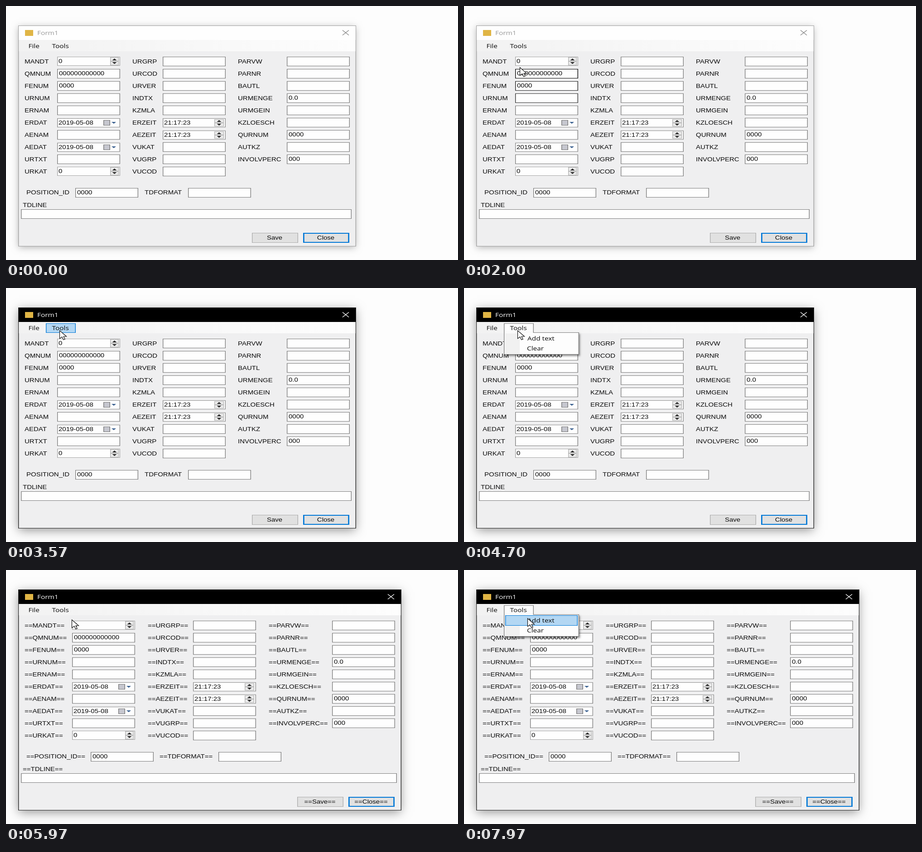
An HTML page with a canvas that plays this animation: 998x561 px, repeating every 8 s.

```html
<!DOCTYPE html>
<html lang="en">
<head>
<meta charset="utf-8">
<title>Form1</title>
<style>
  html, body { margin: 0; width: 100%; height: 100%; overflow: hidden; background: #fdfdfd; }
  canvas { display: block; width: 100vw; height: 100vh; }
</style>
</head>
<body>
<canvas id="stage" width="998" height="561"></canvas>
<script>
const ctx = document.getElementById('stage').getContext('2d');
const LOOP = 8000;
const ACTIVATE = 2900, RELAYOUT = 5900, REPAINT = 5860;
const MENU_OPEN = [[4250, REPAINT], [6950, LOOP]];
const SANS = '12px "Liberation Sans", Arial, sans-serif';
const UI = '12.3px "Open Sans", "Noto Sans", sans-serif';
const WIDE = 1.25;
const EDGE = 1.37;      // so upright lines are thicker than level ones
const BOX_W = 139, BLUE = '#0078d7', FACE = '#efeff0';

const COLUMNS = [
  'MANDT QMNUM FENUM URNUM ERNAM ERDAT AENAM AEDAT URTXT URKAT',
  'URGRP URCOD URVER INDTX KZMLA ERZEIT AEZEIT VUKAT VUGRP VUCOD',
  'PARVW PARNR BAUTL URMENGE URMGEIN KZLOESCH QURNUM AUTKZ INVOLVPERC'
].map(s => s.split(' '));
const VALUES = {
  MANDT: '0', URKAT: '0', QMNUM: '000000000000', FENUM: '0000',
  ERDAT: '2019-05-08', AEDAT: '2019-05-08', ERZEIT: '21:17:23', AEZEIT: '21:17:23',
  URMENGE: '0.0', QURNUM: '0000', INVOLVPERC: '000', POSITION_ID: '0000'
};
const KINDS = {
  MANDT: 'number', URKAT: 'number', ERDAT: 'date', AEDAT: 'date',
  ERZEIT: 'time', AEZEIT: 'time'
};
const NARROW = {
  right: 772, mark: '', labels: [41, 279, 512], boxes: [113, 346, 620],
  position: 153, formatLabel: 306, format: 402
};
const BROAD = {
  right: 872, mark: '==', labels: [41, 313, 580], boxes: [146, 413, 720],
  position: 187, formatLabel: 339, format: 469
};

// time, x, y of the pointer tip
const PATH = [
  [1270, -14, 482], [1350, 33, 461], [1400, 33, 461], [1500, 58, 395], [1700, 105, 245],
  [1800, 122, 196], [1900, 124, 160], [2000, 123, 136], [2250, 118, 94],
  [5150, 118, 94], [5500, 145, 110], [6200, 145, 110], [6500, 133, 87],
  [7000, 133, 87], [7350, 140, 107]
];

function pointer(t) {
  if (t < PATH[0][0]) return null;
  const i = PATH.findIndex(p => p[0] > t);
  if (i < 0) return PATH[PATH.length - 1].slice(1);
  const [t0, x0, y0] = PATH[i - 1], [t1, x1, y1] = PATH[i];
  const k = (t - t0) / (t1 - t0);
  return [x0 + (x1 - x0) * k, y0 + (y1 - y0) * k];
}

function inside(p, x, y, w, h) {
  return p && p[0] > x && p[0] < x + w && p[1] > y && p[1] < y + h;
}

// 1 while the pointer is on the box, fading out after it leaves
function glow(t, x, y, w, h) {
  if (t > ACTIVATE) return 0;
  for (let age = 0; age < 500; age += 20)
    if (inside(pointer(t - age), x + 1, y + 1, w - 2, h - 2)) return 1 - age / 500;
  return 0;
}

function fill(color, x, y, w, h) {
  ctx.fillStyle = color;
  ctx.fillRect(x, y, w, h);
}

function frame(x, y, w, h, back, border, line = 1) {
  const side = line * EDGE;
  fill(border, x, y, w, h);
  fill(back, x + side, y + line, w - 2 * side, h - 2 * line);
}

function text(s, x, y, color = '#0a0a0a', font = SANS, align = 'left') {
  ctx.save();
  ctx.translate(x, y);
  ctx.scale(WIDE, 1);
  ctx.font = font;
  ctx.textAlign = align;
  ctx.fillStyle = color;
  ctx.fillText(s, 0, 0);
  ctx.restore();
}

function poly(points, color, outline) {
  ctx.beginPath();
  points.forEach(([x, y]) => ctx.lineTo(x, y));
  ctx.closePath();
  ctx.fillStyle = color;
  ctx.fill();
  if (outline) {
    ctx.strokeStyle = outline;
    ctx.lineWidth = 1.2;
    ctx.stroke();
  }
}

function spinner(x, y, w, h) {
  const half = h / 2, cx = x + w / 2, cy = y + half;
  frame(x, y, w, half, '#ececec', '#b4b4b4');
  frame(x, cy, w, half, '#ececec', '#b4b4b4');
  poly([[cx - 5, cy - 2], [cx + 5, cy - 2], [cx, cy - 6]], '#222');
  poly([[cx - 5, cy + 2], [cx + 5, cy + 2], [cx, cy + 6]], '#222');
}

function textBox(t, x, y, w, value) {
  const shade = Math.round(124 * (1 - glow(t, x, y, w, 21)));
  frame(x, y, w, 21, '#fefefe', `rgb(${shade},${shade},${shade})`);
  if (value) text(value, x + 4, y + 14);
}

function field(t, name, x, y) {
  const kind = KINDS[name], value = VALUES[name];
  if (!kind) return textBox(t, x, y, BOX_W, value);
  if (kind !== 'number') y += 1;
  frame(x, y, BOX_W, 20, '#fefefe', kind === 'number' ? '#a6a6a6' : '#8c8c8c');
  text(value, x + 3, y + 14);
  if (kind === 'number') spinner(x + 117, y + 1, 19, 18);
  if (kind === 'time') spinner(x + 114, y + 2, 21, 16);
  if (kind === 'date') {
    frame(x + 102, y + 4, 15, 12, '#c6c7cf', '#757575');
    poly([[x + 120, y + 8], [x + 130, y + 8], [x + 125, y + 12]], '#3c6291');
  }
}

function button(label, x, focused) {
  frame(x, 501, 102, 22, '#e1e1e1', focused ? BLUE : '#adadad', focused ? 2 : 1);
  text(label, x + 50, 516, '#0a0a0a', SANS, 'center');
}

function windowFrame(active, right) {
  const w = right - 27;
  ctx.save();
  ctx.shadowColor = active ? 'rgba(0,0,0,.42)' : 'rgba(0,0,0,.3)';
  ctx.shadowBlur = active ? 22 : 15;
  ctx.shadowOffsetY = active ? 5 : 3;
  fill(FACE, 28, 44, w - 2, 486);
  ctx.restore();
  frame(27, 43, w + 1, 488, FACE, active ? '#222' : '#a0a0a0');
  fill(active ? '#000' : '#fefefe', 28, 44, w - 1, 31);
  const strip = ctx.createLinearGradient(28, 0, right, 0);
  strip.addColorStop(0, '#f2f2f2');
  strip.addColorStop(1, '#fdfdfd');
  fill(strip, 27 + EDGE, 75, w + 1 - 2 * EDGE, 25);

  fill('#e0b545', 42, 53, 18, 13);
  text('Form1', 69, 64, active ? '#fff' : '#999', UI);
  const cx = right - 22;
  ctx.strokeStyle = active ? '#fff' : '#868686';
  ctx.lineWidth = 1.3;
  ctx.beginPath();
  ctx.moveTo(cx - 7, 53.5); ctx.lineTo(cx + 7, 64.5);
  ctx.moveTo(cx + 7, 53.5); ctx.lineTo(cx - 7, 64.5);
  ctx.stroke();
}

function formBody(t, layout) {
  const wrap = s => layout.mark + s + layout.mark;
  COLUMNS.forEach((names, c) => names.forEach((name, r) => {
    const y = Math.round(112 + 27.05 * r);
    text(wrap(name), layout.labels[c], y + 15);
    field(t, name, layout.boxes[c], y);
  }));
  text(wrap('POSITION_ID'), 45, 416);
  textBox(t, layout.position, 402, BOX_W, VALUES.POSITION_ID);
  text(wrap('TDFORMAT'), layout.formatLabel, 416);
  textBox(t, layout.format, 402, BOX_W);
  text(wrap('TDLINE'), 37, 444);
  textBox(t, 33, 449, layout.right - 42, '');
  button(wrap('Save'), layout.right - 229, false);
  button(wrap('Close'), layout.right - 116, true);
}

// Half repainted fields just after the menu is dismissed
function tornFields() {
  fill(FACE, 112, 111, 148, 42);
  fill('#fefefe', 113, 114, 20, 17);
  fill('#a6a6a6', 113, 114, EDGE, 17);
  text('0', 116, 126);
  frame(142, 112, 118, 21, '#fefefe', '#b0b0b0');
  fill('#fefefe', 113, 149, 30, 4);
  fill('#fefefe', 142, 139, 118, 14);
  fill('#7c7c7c', 142, 139, 118, 1);
  ctx.save();
  ctx.beginPath();
  ctx.rect(142, 140, 118, 13);
  ctx.rect(113, 150, 29, 3);
  ctx.clip();
  text('000000000000', 147, 157);
  text('000', 117, 154);
  ctx.restore();
  fill('#7c7c7c', 113, 149, EDGE, 4);
}

function menuBar(open, hot) {
  if (open || hot)
    frame(88, 78, 66, 21, open ? '#fcfcfc' : '#b3d7f3', open ? '#808080' : BLUE);
  if (open) fill('#fcfcfc', 88 + EDGE, 98, 66 - 2 * EDGE, 1);
  text('File', 49.5, 92.5, '#0a0a0a', UI);
  text('Tools', 101.5, 92.5, '#0a0a0a', UI);
}

function dropDown(p) {
  ctx.save();
  ctx.shadowColor = 'rgba(0,0,0,.45)';
  ctx.shadowBlur = 4;
  ctx.shadowOffsetX = ctx.shadowOffsetY = 3;
  fill('#fdfdfd', 89, 98, 164, 49);
  ctx.restore();
  frame(88, 98, 166, 49, '#fdfdfd', '#808080');
  fill('#fcfcfc', 88 + EDGE, 98, 66 - 2 * EDGE, 1);
  fill('#f1f1f1', 91, 100, 32, 45);
  if (inside(p, 90, 99, 162, 24)) frame(91, 100, 160, 23, '#b3d7f3', BLUE);
  text('Add text', 140, 115.5, '#0a0a0a', UI);
  text('Clear', 139, 138, '#0a0a0a', UI);
}

function drawPointer([x, y]) {
  const arrow = [[0, 0], [0, 17], [4, 13.4], [6.4, 19.5], [9, 18.4], [6.6, 12.5], [11.5, 12.5]];
  poly(arrow.map(([a, b]) => [x + .5 + a * 1.3, y + b * 1.04]), '#fff', '#111');
}

function draw(t) {
  const active = t >= ACTIVATE;
  const layout = t < RELAYOUT ? NARROW : BROAD;
  const torn = t >= REPAINT && t < RELAYOUT;
  const open = MENU_OPEN.some(([a, b]) => t >= a && t < b);
  const p = pointer(t);
  fill('#fdfdfd', 0, 0, 998, 561);
  windowFrame(active, layout.right);
  formBody(t, layout);
  if (torn) tornFields();
  menuBar(open || torn, active && inside(p, 88, 77, 66, 22));
  if (open) dropDown(p);
  if (p) drawPointer(p);
}

const start = performance.now();
function tick() {
  draw((performance.now() - start) % LOOP);
  requestAnimationFrame(tick);
}
tick();
</script>
</body>
</html>
```
